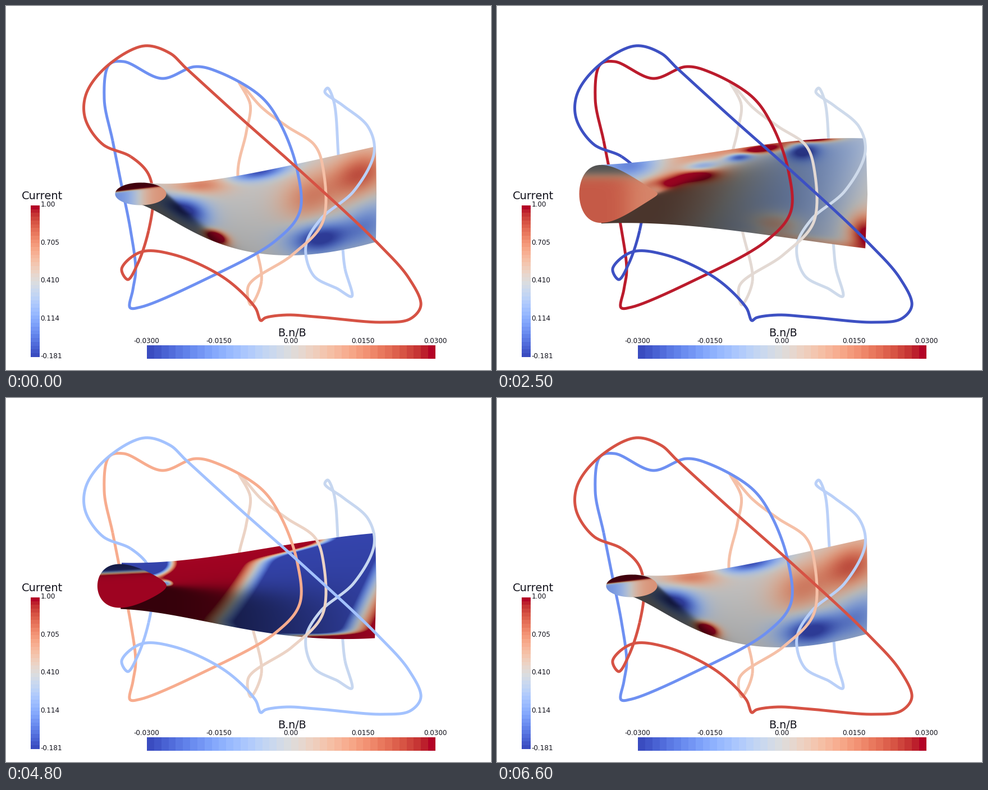
A matplotlib script for the animation above (6.7 s loop, 864 by 648 pixels).

```python
import numpy as np
import matplotlib.pyplot as plt
from matplotlib.animation import FuncAnimation
from matplotlib.path import Path

W, H, DPI = 864, 648, 72
FRAMES, HALF = 67, 33
CMAP = plt.get_cmap("coolwarm")
INK = "#10101a"
X0, X1, Y0, Y1 = 130, 670, 225, 455  # box that holds the surface
X, Y = np.meshgrid(np.arange(X0, X1) + 0.5, np.arange(Y0, Y1) + 0.5)
XS = X[0]
U = (XS - 245) / 415  # position along the surface
T = np.linspace(0, 1, 60)


def mix(a, b, s):
    return a + (b - a) * s


def step(d):
    return 0.5 + 0.5 * np.tanh(d / 2)


def progress(k):
    return step(0.348 * (k - HALF / 2))


def spline(points, n=24):
    """Closed centripetal Catmull-Rom curve, n samples per segment."""
    p = np.asarray(points, float)
    nxt = np.roll(p, -1, 0)
    h = np.sqrt(np.hypot(*(nxt - p).T))[:, None]
    h0 = np.roll(h, 1, 0)
    d = (nxt - p) / h
    m = (np.roll(d, 1, 0) * h + d * h0) / (h + h0)
    u = np.linspace(0, 1, n, endpoint=False)[None, :, None]
    a, b, ma, mb, k = (q[:, None] for q in (p, nxt, m, np.roll(m, -1, 0), h))
    c = ((2*u**3 - 3*u**2 + 1) * a + (u**3 - 2*u**2 + u) * k * ma
         + (3*u**2 - 2*u**3) * b + (u**3 - u**2) * k * mb)
    c = c.reshape(-1, 2)
    return np.vstack([c, c[:1]])


def bezier(p):
    a, b, c, d = np.asarray(p, float)[:, None]
    t = T[:, None]
    return a*(1-t)**3 + 3*b*t*(1-t)**2 + 3*c*t*t*(1-t) + d*t**3


# Coils: the first segments of each one run behind the surface.
RED = [(254, 400), (262, 340), (253, 298), (222, 268), (172, 246), (141, 200),
       (143, 156), (180, 107), (246, 71), (292, 84), (320, 110), (420, 201),
       (516, 286), (660, 420), (718, 485), (739, 533), (720, 557), (670, 563),
       (560, 554), (500, 550), (462, 555), (454, 560), (444, 537), (390, 485),
       (300, 443), (240, 438), (206, 468), (217, 487), (235, 458)]
BLUE = [(231, 470), (222, 400), (205, 315), (190, 240), (175, 165), (184, 104),
        (210, 99), (278, 129), (337, 108), (380, 118), (455, 162), (490, 212),
        (519, 293), (523, 367), (480, 418), (350, 489), (240, 536), (221, 537),
        (226, 505)]
PEACH = [(455, 490), (438, 404), (413, 300), (428, 225), (435, 175), (415, 135),
         (455, 180), (500, 214), (550, 248), (565, 290), (564, 385), (510, 443),
         (432, 498), (436, 532)]
PALE = [(604, 468), (600, 432), (592, 265), (584, 170), (573, 146), (568, 153),
        (600, 177), (645, 215), (656, 260), (620, 329), (560, 380), (534, 428),
        (548, 480), (590, 503), (616, 517)]
# points, hidden segments, level at start, level at end
COILS = [(PALE, 3, 0.38, 0.45), (PEACH, 4, 0.64, 0.52),
         (BLUE, 3, 0.16, 1.02), (RED, 3, 0.905, -0.035)]

# Bezier edges of the surface, at the start and at the end.
TOP = np.array([[(245, 314), (330, 326), (470, 292), (659, 250)],
                [(183, 281), (350, 272), (500, 225), (657, 235)]], float)
BOTTOM = np.array([[(240, 353), (320, 382), (405, 492), (659, 420)],
                   [(183, 389), (340, 380), (500, 408), (656, 432)]], float)


def edges(s):
    top, bottom = bezier(mix(*TOP, s)), bezier(mix(*BOTTOM, s))
    top[:, 1] += 20 * s * (1 - s) * np.sin(np.pi * T)
    return top, bottom


def mouth_shape(s):
    """Ellipse that opens into a teardrop."""
    a = np.linspace(0, 2 * np.pi, 90)
    x = mix(240, 215, s) - mix(45.5, 71, s) * np.cos(a)
    y = 334.5 + mix(20, 45, s) * np.sin(a) * (1 + 0.75 * s * np.cos(a))
    return np.column_stack([x, y])


# Bumps of the field at four stages: along, across, their radii, height.
STAGES = [progress(k) for k in (0, 9, 18, 32)]
BUMPS = [
    [(0.25, 0.07, 0.13, 0.17, 0.55), (0.50, 0.00, 0.13, 0.10, -0.95),
     (0.71, 0.38, 0.13, 0.27, 0.5), (0.93, 0.25, 0.13, 0.25, 0.75),
     (0.76, 0.84, 0.14, 0.17, -1.1), (0.97, 0.78, 0.10, 0.25, -0.5),
     (0.18, 0.60, 0.10, 0.26, -1.1), (0.31, 0.92, 0.05, 0.10, 1.7)],
    [(0.29, 0.10, 0.14, 0.20, 0.85), (0.72, 0.68, 0.20, 0.32, -1.9),
     (0.47, 0.83, 0.11, 0.20, -0.9), (0.60, 0.15, 0.10, 0.25, -0.35),
     (0.20, 0.48, 0.08, 0.12, -0.6), (0.31, 0.88, 0.06, 0.12, 1.8)],
    [(0.00, 0.05, 0.13, 0.25, -6), (0.62, 0.00, 0.22, 0.08, 5),
     (0.75, 1.00, 0.25, 0.05, 3.5), (0.10, 0.42, 0.04, 0.08, -3)],
    [(0.13, 0.39, 0.09, 0.10, 0.9), (0.27, 0.30, 0.10, 0.09, 1.2),
     (0.29, 0.17, 0.08, 0.07, -0.85), (0.45, 0.10, 0.06, 0.06, -1.2),
     (0.54, 0.05, 0.10, 0.04, 1.4), (0.72, 0.10, 0.07, 0.10, -1.0),
     (0.77, 0.00, 0.10, 0.03, 1.6), (0.61, 0.87, 0.11, 0.13, 0.7),
     (0.99, 0.87, 0.07, 0.17, 1.1)],
]
WAVE = [0, 0, 3, 0]
ROOF, LEFT, RIGHT = [1.3, -0.1, -1.6, 0.2], [-0.6, 0.35, 2, 0.55], [0.45, 1.3, 2, 0.3]


def field(v, stage):
    f = WAVE[stage] * np.cos(np.pi * (U + 0.22 * v - 0.24) / 0.58)
    for u0, v0, ru, rv, height in BUMPS[stage]:
        f = f + height * np.exp(-((U - u0) / ru)**2) * np.exp(-((v - v0) / rv)**2)
    return f


def paint(values, light):
    rgb = CMAP(np.clip((values + 1) / 2, 0, 1))[..., :3]
    return rgb * light[..., None]


def outside(s, top, bottom):
    y0, y1 = np.interp(XS, *top.T), np.interp(XS, *bottom.T)
    v = (Y - y0) / (y1 - y0)
    i = int(np.clip(np.searchsorted(STAGES, s) - 1, 0, 2))
    part = np.clip((s - STAGES[i]) / (STAGES[i + 1] - STAGES[i]), 0, 1)
    values = mix(field(v, i), field(v, i + 1), part)
    # the underside beyond the ridge lies in shadow
    run = np.clip(XS - 286, 0, None)
    low = step((Y - 334 - run * mix(0.88, -0.42, s)) / (1.5 + 0.05 * run))
    shadow = 0.3 + 0.55 * (run / 374)**1.5
    return paint(values, mix(0.9 - 0.14 * np.clip(v, 0, 1), shadow, low))


def inside(s):
    roof, left, right = (np.interp(s, STAGES, q) for q in (ROOF, LEFT, RIGHT))
    edge = mix(331 - 0.13 * (X - 196), 300, s)
    low = step((Y - edge) / mix(1, 5, s))
    floor = mix(left, right, step((X - 235) / 12))
    return paint(mix(roof, floor, low), mix(0.36, 0.88, low))


fig = plt.figure(figsize=(W / DPI, H / DPI), dpi=DPI, facecolor="white")
ax = fig.add_axes([0, 0, 1, 1])
ax.axis("off")

blank = np.ones(X.shape + (3,))
box = (X0, X1, Y1, Y0)
body = ax.imshow(blank, extent=box, aspect="auto", zorder=2)
mouth = ax.imshow(blank, extent=box, aspect="auto", zorder=3)

# Colour bars
ramp = np.linspace(0, 1, 40)
bar = dict(cmap=CMAP, vmin=0, vmax=1, aspect="auto", interpolation="nearest")
ax.imshow(ramp[::-1, None], extent=(44, 60, 625, 355), **bar)
ax.imshow(ramp[None], extent=(251, 765, 628, 604), **bar)
ax.set_xlim(0, W)
ax.set_ylim(H, 0)


def label(x, y, text, size, ha="center"):
    ax.text(x, y, text, size=size, ha=ha, color=INK, family="DejaVu Sans")


label(64.5, 344, "Current", 19.5)
label(509, 587.5, "B.n/B", 19)
for i, text in enumerate(["1.00", "0.705", "0.410", "0.114", "-0.181"]):
    label(61.5, 357 + 67.6 * i, text, 12, ha="left")
for i, text in enumerate(["-0.0300", "-0.0150", "0.00", "0.0150", "0.0300"]):
    label(250.5 + 128.5 * i, 600, text, 12)

coils = []
for z, (points, hidden, start, end) in enumerate(COILS):
    curve = spline(points)
    cut = hidden * 24
    style = dict(lw=5, solid_joinstyle="round", solid_capstyle="butt")
    back, = ax.plot(*curve[:cut + 1].T, zorder=1 + z / 10, **style)
    front, = ax.plot(*curve[cut:].T, zorder=4 + z / 10, **style)
    coils.append((back, front, start, end))


def draw(i):
    s = progress(HALF - abs(HALF - i))
    top, bottom = edges(s)
    outline = np.vstack([top, [(660, 335)], bottom[::-1], top[:1]])
    body.set_data(outside(s, top, bottom))
    body.set_clip_path(Path(outline), ax.transData)
    mouth.set_data(inside(s))
    mouth.set_clip_path(Path(mouth_shape(s)), ax.transData)
    for back, front, start, end in coils:
        color = CMAP(float(np.clip(mix(start, end, s), 0, 1)))
        back.set_color(color)
        front.set_color(color)
    return []


anim = FuncAnimation(fig, draw, frames=FRAMES, interval=100, repeat=True,
                     repeat_delay=0, blit=False)
plt.show()
```
